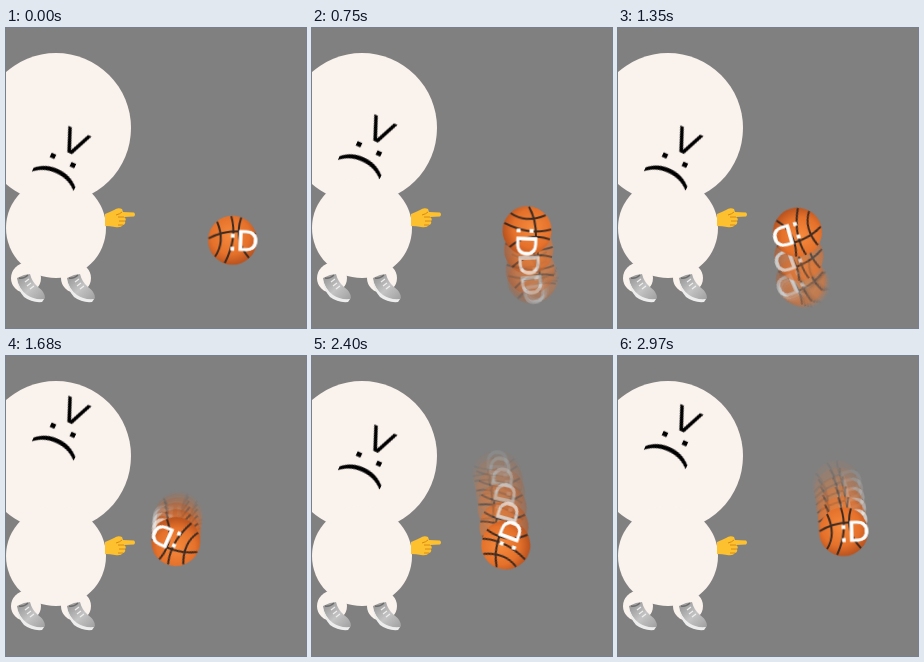
Write an HTML page without scripts that moves like this. It is 300 px wide and 300 px high and loops after 3000 ms.

```html
<!DOCTYPE html>
<html lang="en">
<head>
<meta charset="utf-8">
<title>Bouncing ball</title>
<style>
html, body { margin: 0; width: 100%; height: 100%; overflow: hidden; background: #808080; }
svg { display: block; width: 300px; height: 300px; }
text { font-family: "Liberation Sans", Arial, sans-serif; }

.face { animation: nod 3s infinite cubic-bezier(.39,.575,.565,1); }
.hop { animation: hop 3s calc(var(--k) * 30ms - 3s) infinite cubic-bezier(.39,.575,.565,1); }
.spin { animation: spin 3s calc(var(--k) * 30ms - 3s) infinite linear; }
.ghost { animation: 3s infinite step-end; }

@keyframes spin { from { transform: rotate(1.8deg); } to { transform: rotate(361.8deg); } }

/* each hop: quick rise, accelerating fall, short rest */
@keyframes hop {
  0%, 18.2%, 22.5%, 39%, 43%, 60.5%, 67%, 80.6%, 85% { transform: translateY(0); }
  6.6%, 28.8%, 48.7%, 73.9% { transform: translateY(-85px); animation-timing-function: cubic-bezier(.47,0,.745,.715); }
  90.4% { transform: translateY(-85px); animation-timing-function: cubic-bezier(.45,0,.8,.7); }
  99% { transform: translateY(-36px); animation-timing-function: linear; }
  100% { transform: translateY(-25px); }
}
@keyframes nod {
  0%, 2%, 20.5%, 24%, 41.5%, 45%, 63%, 68.9%, 81.9%, 87% { transform: translateY(0); }
  11.2%, 32.6%, 53.3%, 76% { transform: translateY(-64px); animation-timing-function: cubic-bezier(.47,0,.745,.715); }
  94.9% { transform: translateY(-64px); animation-timing-function: cubic-bezier(.45,0,.8,.7); }
  99% { transform: translateY(-50px); animation-timing-function: linear; }
  100% { transform: translateY(-45px); }
}

/* the trail is empty when the loop begins */
@keyframes h1 { 0% { visibility: hidden; } 1%, 100% { visibility: visible; } }
@keyframes h2 { 0% { visibility: hidden; } 2%, 100% { visibility: visible; } }
@keyframes h3 { 0% { visibility: hidden; } 3%, 100% { visibility: visible; } }
@keyframes h4 { 0% { visibility: hidden; } 4%, 100% { visibility: visible; } }
@keyframes h5 { 0% { visibility: hidden; } 5%, 100% { visibility: visible; } }
</style>
</head>
<body>
<svg viewBox="0 0 300 300">
  <defs>
    <radialGradient id="skin" cx=".45" cy=".4" r=".6">
      <stop offset="0" stop-color="#f58a3c"/>
      <stop offset=".65" stop-color="#e5712b"/>
      <stop offset="1" stop-color="#b9531f"/>
    </radialGradient>
    <linearGradient id="steel" x1="0" y1="0" x2="1" y2="1">
      <stop offset="0" stop-color="#8f8f8f"/>
      <stop offset=".5" stop-color="#c4c4c4"/>
      <stop offset="1" stop-color="#9c9c9c"/>
    </linearGradient>
    <g id="ball">
      <g transform="translate(26 -16)">
        <circle r="24.5" fill="url(#skin)"/>
        <g fill="none" stroke="#3b2a22" stroke-width="2">
          <path d="M-24-1Q-4-13 23-7"/>
          <path d="M-2-24Q5-2-7 23"/>
          <path d="M-16-18Q-7 2-17 17"/>
          <path d="M8-23Q1 0 17 17"/>
        </g>
      </g>
      <text x="22" y="-6" font-size="30" fill="#fff" stroke="#fff" stroke-width=".8">:D</text>
    </g>
    <g id="shoe">
      <path d="M11 250L18 247L24 246Q26 254 32 259Q39 264 39 270L36 274Q27 273 20 268Q12 259 11 250Z" fill="url(#steel)"/>
      <path d="M11 252Q13 261 21 267Q28 272 38 271L36 274Q26 275 18 269Q11 261 11 252Z" fill="#ededed"/>
      <path d="M23 251l-4 3M25 255l-4 3M28 258l-4 3" stroke="#eee" stroke-width="1.2"/>
      <path d="M13 250q5 1 9-3" fill="none" stroke="#6c6c6c" stroke-width="1.5"/>
    </g>
  </defs>

  <rect width="300" height="300" fill="#808080"/>

  <g fill="#faf2ed">
    <circle cx="50" cy="100" r="75"/>
    <circle cx="50" cy="200" r="50"/>
    <circle cx="20" cy="250" r="15"/>
    <circle cx="70" cy="250" r="15"/>
  </g>
  <use href="#shoe"/>
  <use href="#shoe" x="50"/>

  <g stroke-linejoin="round">
    <path d="M99 186Q104 184 108 182Q112 179 116 181L117 184L128 184.500Q130 186.500 128 188.500L118 189Q121 191 119 193Q120 196 117 197Q115 200 109 199Q104 198 99 198Z" fill="#fdc02f"/>
    <path d="M110 187Q114 186 116 184M118 189H112M119 193H113M117 197H112" fill="none" stroke="#d98a14" stroke-width="1"/>
  </g>

  <g class="face">
    <text transform="translate(60 94) rotate(115)" font-size="50">&gt;:(</text>
  </g>

  <g transform="translate(200 228)">
    <g class="ghost" style="--k:5;opacity:.08;animation-name:h5"><g class="hop"><g class="spin"><use href="#ball"/></g></g></g>
    <g class="ghost" style="--k:4;opacity:.14;animation-name:h4"><g class="hop"><g class="spin"><use href="#ball"/></g></g></g>
    <g class="ghost" style="--k:3;opacity:.22;animation-name:h3"><g class="hop"><g class="spin"><use href="#ball"/></g></g></g>
    <g class="ghost" style="--k:2;opacity:.37;animation-name:h2"><g class="hop"><g class="spin"><use href="#ball"/></g></g></g>
    <g class="ghost" style="--k:1;opacity:.6;animation-name:h1"><g class="hop"><g class="spin"><use href="#ball"/></g></g></g>
    <g style="--k:0"><g class="hop"><g class="spin"><use href="#ball"/></g></g></g>
  </g>
</svg>
</body>
</html>
```
